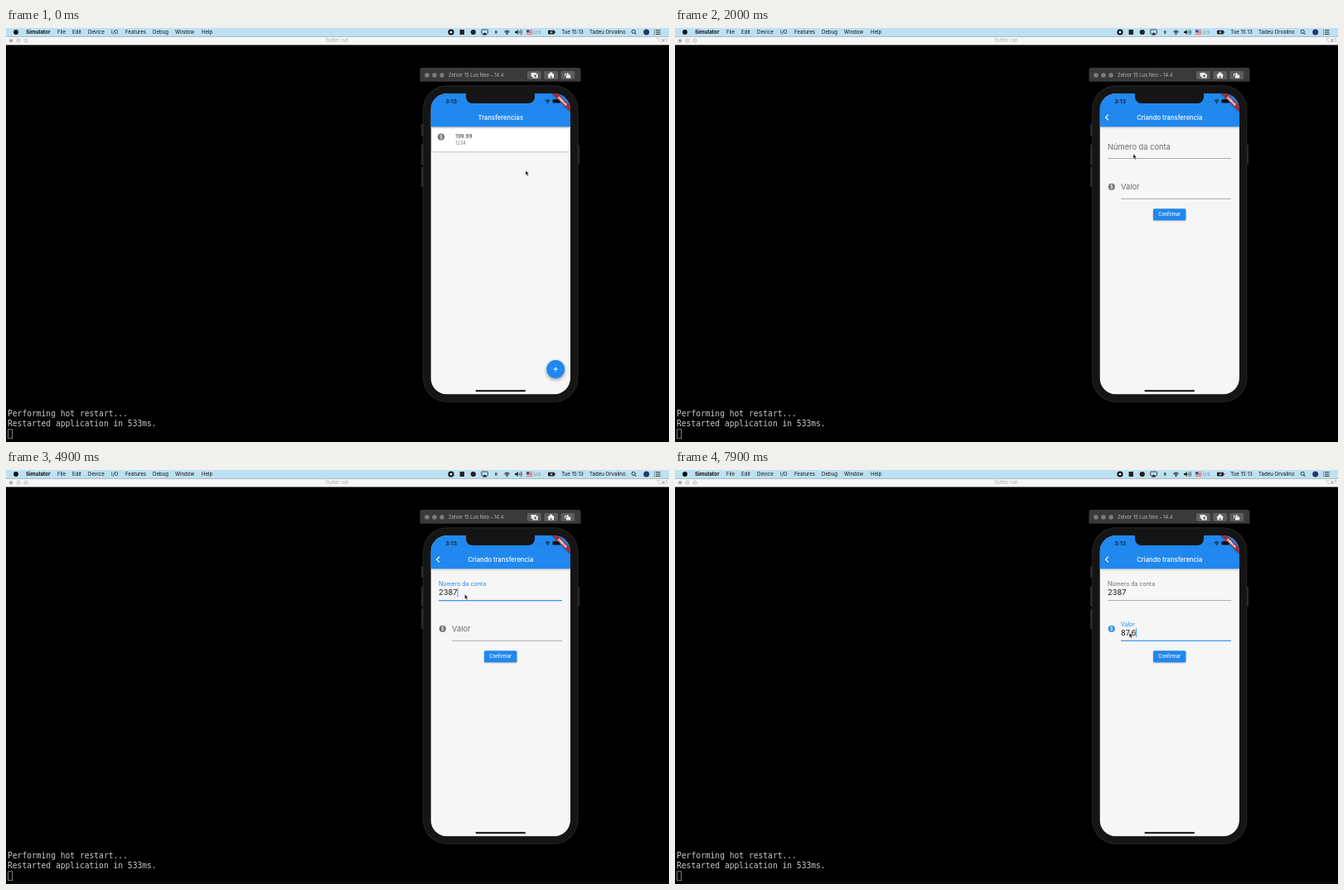
Recreate the animation shown at these times as an HTML page with a canvas. Size 800 by 500 pixels, loop 8 s.

```html
<!DOCTYPE html>
<html lang="pt">
<head>
<meta charset="utf-8">
<title>Transferencias</title>
<style>
html, body { margin: 0; width: 100%; height: 100%; overflow: hidden; background: #000; }
canvas { display: block; width: 800px; height: 500px; }
</style>
</head>
<body>
<canvas id="stage"></canvas>
<script>
const canvas = document.getElementById('stage');
const ctx = canvas.getContext('2d');
const ratio = window.devicePixelRatio || 1;
canvas.width = 800 * ratio;
canvas.height = 500 * ratio;

const LOOP = 8000, STEP = 100;
const BLUE = '#2088ee', GRAY = '#6c6c6c', PAGE = '#f6f6f6', INK = '#1c1c1c';
const SANS = 'Inter, "Liberation Sans", sans-serif';
const SCREEN = { x: 512.5, y: 79, w: 168.5, h: 363.5, r: 20 };

const PUSH_AT = 1480, PUSH_MS = 400;
const account = { focus: 2250, blur: 5710, keys: [[3850, '2'], [4150, '3'], [4400, '8'], [4820, '7']] };
const amount = { focus: 5710, blur: Infinity, keys: [[6670, '8'], [7020, '7'], [7330, '.'], [7560, '6']] };
const pointerPath = [
  [50, 627, 172], [450, 640, 290], [900, 662.5, 401.5], [1500, 662.5, 401.5],
  [1950, 553, 152], [2250, 553, 152], [2350, 553.5, 150], [4900, 553.5, 150], [5500, 548.3, 196.5]
];

const clamp = v => Math.max(0, Math.min(1, v));
const smooth = v => { v = clamp(v); return v * v * (3 - 2 * v); };
const mix = (a, b, k) => a + (b - a) * k;
const ramp = (t, start, ms) => clamp((t - start) / ms);

function mixColor(a, b, k) {
  const part = (c, i) => parseInt(c.slice(1 + 2 * i, 3 + 2 * i), 16);
  return `rgb(${[0, 1, 2].map(i => Math.round(mix(part(a, i), part(b, i), k)))})`;
}

function rect(x, y, w, h, color) {
  ctx.fillStyle = color;
  ctx.fillRect(x, y, w, h);
}

function round(x, y, w, h, r, color) {
  ctx.beginPath();
  ctx.roundRect(x, y, w, h, r);
  if (color) { ctx.fillStyle = color; ctx.fill(); }
}

function disc(x, y, r, color) {
  ctx.beginPath();
  ctx.arc(x, y, r, 0, 7);
  ctx.fillStyle = color;
  ctx.fill();
}

function line(color, width, ...pts) {
  ctx.beginPath();
  for (let i = 0; i < pts.length; i += 2) ctx.lineTo(pts[i], pts[i + 1]);
  ctx.strokeStyle = color;
  ctx.lineWidth = width;
  ctx.stroke();
}

function shape(color, ...pts) {
  ctx.beginPath();
  for (let i = 0; i < pts.length; i += 2) ctx.lineTo(pts[i], pts[i + 1]);
  ctx.closePath();
  ctx.fillStyle = color;
  ctx.fill();
}

// y is the middle of the capital letters
function text(str, x, y, size, color, weight = 400, align = 'left') {
  ctx.font = `${weight} ${size}px ${SANS}`;
  ctx.textAlign = align;
  ctx.fillStyle = color;
  ctx.fillText(str, x, y + size * 0.36);
}

function withShadow(color, blur, dy, draw) {
  ctx.save();
  ctx.shadowColor = color;
  ctx.shadowBlur = blur * ratio;
  ctx.shadowOffsetY = dy * ratio;
  draw();
  ctx.restore();
}

function wifi(x, y, size) {
  ctx.strokeStyle = '#111';
  ctx.lineWidth = size * 0.2;
  for (const k of [0.45, 0.75, 1.05]) {
    ctx.beginPath();
    ctx.arc(x, y, size * k, -2.35, -0.79);
    ctx.stroke();
  }
  disc(x, y - size * 0.1, size * 0.18, '#111');
}

function magnifier(x, y) {
  ctx.beginPath();
  ctx.arc(x, y, 2.1, 0, 7);
  ctx.strokeStyle = '#111';
  ctx.lineWidth = 0.8;
  ctx.stroke();
  line('#111', 0.9, x + 1.5, y + 1.5, x + 3.4, y + 3.4);
}

function menuBar() {
  rect(0, 0, 800, 10.3, '#bce1f2');
  disc(12, 5, 2.9, '#111');
  text('Simulator', 24, 5.1, 6.3, '#111', 700);
  const menus = { File: 62, Edit: 80, Device: 99, 'I/O': 127, Features: 144, Debug: 177, Window: 204, Help: 236 };
  for (const name in menus) text(name, menus[name], 5.1, 6.1, '#111');

  disc(537, 5, 3.6, '#111');
  disc(537, 5, 1.5, '#e4f2f8');
  rect(547.6, 2, 5.4, 6, '#222');
  disc(563.8, 5, 3.1, '#222');
  round(573.8, 2, 7.6, 5, 0.7);
  ctx.strokeStyle = '#222';
  ctx.lineWidth = 0.8;
  ctx.stroke();
  shape('#222', 575, 8.5, 577.6, 5.2, 580.2, 8.5);
  rect(590, 3.2, 2.6, 3.6, '#55666e');
  wifi(604.5, 7.8, 4.4);
  shape('#222', 614, 4, 615.5, 4, 617.7, 2, 617.7, 8, 615.5, 6, 614, 6);
  for (const r of [1.6, 3.2, 4.8]) {
    ctx.beginPath();
    ctx.arc(617.6, 5, r, -0.75, 0.75);
    ctx.strokeStyle = '#222';
    ctx.lineWidth = 0.7;
    ctx.stroke();
  }
  rect(628, 2.4, 7.4, 5.2, '#f1e4e6');
  for (let i = 0; i < 4; i++) rect(628, 2.4 + i * 1.5, 7.4, 0.75, '#cf4353');
  rect(628, 2.4, 3.4, 2.8, '#35518f');
  text('U.S.', 637, 5.2, 5, '#62757e');
  round(654, 2.8, 8, 4.6, 0.8, '#222');
  rect(662.4, 4.2, 0.8, 1.8, '#222');
  shape('#d6ebf4', 658.7, 3.2, 656.3, 5.4, 657.8, 5.4, 657.3, 7, 659.8, 4.7, 658.2, 4.7);
  text('Tue 15:13', 670.2, 5.1, 6.1, '#111');
  text('Tadeu Orvalino', 704, 5.1, 6.1, '#111');
  magnifier(757.2, 4.4);
  disc(772.7, 5, 3.5, '#27356b');
  for (const y of [2.7, 5, 7.3]) {
    rect(782, y - 0.4, 1, 0.9, '#222');
    rect(784, y - 0.4, 5.6, 0.9, '#222');
  }
}

function terminal() {
  rect(0, 10.3, 800, 10.2, '#f6f6f6');
  for (const x of [6, 15, 24]) {
    disc(x, 15.3, 2.7, '#c9c9c9');
    disc(x, 15.3, 2.2, x === 6 ? '#d4d4d4' : '#dedede');
  }
  disc(6, 15.3, 0.9, '#555');
  text('flutter run', 399.6, 15.3, 6, '#adadad', 400, 'center');
  text('⌥⌘1', 798, 15.3, 5.6, '#9a9a9a', 400, 'right');

  ctx.font = '9.65px "DejaVu Sans Mono", monospace';
  ctx.textAlign = 'left';
  ctx.fillStyle = '#c9c9c9';
  ctx.fillText('Performing hot restart...', 2, 468.6);
  ctx.fillText('Restarted application in 533ms.', 2, 481.2);
  ctx.strokeStyle = '#9a9a9a';
  ctx.lineWidth = 0.8;
  ctx.strokeRect(2.6, 484.8, 5, 11);
}

function simulatorBar() {
  round(499.5, 48, 194, 16.8, [3, 3, 0, 0], '#3a3a3a');
  for (const x of [508, 517, 526]) disc(x, 57, 2.8, '#7b7b7b');
  text('Zelvor 15 Lux Neo – 14.4', 534, 57, 5.8, '#b9b9b9');
  for (const x of [629, 649.3, 669.5]) round(x, 52, 16.8, 10, 1.8, '#5d5d5d');
  round(633.5, 54, 6.2, 4.6, 0.6, '#e6e6e6');
  round(635.3, 55.6, 6.5, 4.8, 0.8, '#f2f2f2');
  disc(638.6, 58, 1.4, '#5d5d5d');
  shape('#f2f2f2', 653.2, 57.2, 657.7, 53, 662.2, 57.2, 661, 57.2, 661, 60.5, 654.4, 60.5, 654.4, 57.2);
  rect(656.9, 58, 1.6, 2.5, '#5d5d5d');
  round(676, 56.6, 5.2, 4, 0.5, '#f2f2f2');
  line('#f2f2f2', 0.9, 674.5, 58.5, 674.5, 55.4, 678, 55.4);
  shape('#f2f2f2', 677.2, 53.7, 679.4, 55.4, 677.2, 57);
}

function appBar(title) {
  withShadow('rgba(0,0,0,.35)', 3, 1, () => rect(SCREEN.x, SCREEN.y, SCREEN.w, 40.3, BLUE));
  text(title, 596.8, 108, 7.65, '#fff', 500, 'center');
}

function coin(x, y, color) {
  disc(x, y, 4, color);
  text('$', x, y, 6.4, PAGE, 600, 'center');
}

function listPage() {
  rect(SCREEN.x, SCREEN.y, SCREEN.w, SCREEN.h, PAGE);
  withShadow('rgba(0,0,0,.3)', 2, 0.5, () => round(514, 120.8, 165.6, 28.2, 1.4, '#fff'));
  coin(525, 131.6, GRAY);
  text('199.99', 542.3, 130.8, 6.4, '#2a2a2a');
  text('1234', 542.3, 139.2, 5.5, '#7d7d7d');
  appBar('Transferencias');
  withShadow('rgba(0,0,0,.38)', 4.5, 2, () => disc(663.2, 412, 11, BLUE));
  line('#fff', 0.9, 660.5, 412, 665.9, 412);
  line('#fff', 0.9, 663.2, 409.3, 663.2, 414.7);
}

function caretAlpha(t, field) {
  const last = field.keys.reduce((at, [k]) => k <= t ? k : at, field.focus);
  const s = t - last - 700;
  if (s < 0) return 1;
  const phase = s % 1000;
  return phase < 500 ? 1 - ramp(phase, 0, 200) : ramp(phase, 500, 200);
}

function textField(t, field, x, y, label, hint) {
  const lift = smooth(ramp(t, field.focus, 200));
  const active = lift * (1 - ramp(t, field.blur, 200));
  const value = field.keys.filter(([at]) => at <= t).map(k => k[1]).join('');
  const tint = mixColor(GRAY, BLUE, active);
  text(label, x, y - 5.8 * lift, mix(9.3, 7, lift), tint);

  const hintAlpha = lift * (1 - ramp(t, field.keys[0][0], 200));
  ctx.globalAlpha = hintAlpha;
  text(hint, x, y + 4.3, 9.4, '#858585');
  ctx.globalAlpha = 1;
  text(value, x, y + 4.3, 9.4, INK);

  if (t >= field.focus && t < field.blur) {
    ctx.globalAlpha = caretAlpha(t, field);
    rect(x + ctx.measureText(value).width, y - 1, 0.8, 11, BLUE);
    ctx.globalAlpha = 1;
  }
  const thick = mix(0.65, 1.1, active);
  rect(x, y + 14.2 - thick / 2, 671 - x, thick, mixColor('#858585', BLUE, active));
  return tint;
}

function formPage(t) {
  rect(SCREEN.x, SCREEN.y, SCREEN.w, SCREEN.h, PAGE);
  appBar('Criando transferencia');
  line('#fff', 1.2, 523, 104.6, 519.6, 108, 523, 111.4);
  textField(t, account, 522, 143.5, 'Número da conta', '0000');
  const tint = textField(t, amount, 538, 192, 'Valor', '00.00');
  coin(526.8, 191.7, tint);
  withShadow('rgba(0,0,0,.3)', 2, 0.7, () => round(577, 218.3, 39.4, 14, 1.5, BLUE));
  text('Confirmar', 596.7, 225.3, 5.55, '#fff', 500, 'center');
}

function debugRibbon() {
  ctx.save();
  ctx.translate(SCREEN.x + SCREEN.w, SCREEN.y);
  ctx.rotate(Math.PI / 4);
  withShadow('rgba(0,0,0,.5)', 2.4, 0, () => rect(-16, 11, 32, 4.7, '#a42a38'));
  text('DEBUG', 0, 13.4, 4, '#fff', 900, 'center');
  ctx.restore();
}

function phone(t) {
  for (const [x, y, h] of [[501, 116, 14], [501, 140.5, 24.5], [501, 167.5, 24.5], [689, 141, 24]])
    round(x, y, 3, h, 0.8, '#2b2b2b');
  round(503, 69.3, 187.4, 382.7, 29, '#222');
  round(504.2, 70.5, 185, 380.3, 28, '#151515');

  ctx.save();
  round(SCREEN.x, SCREEN.y, SCREEN.w, SCREEN.h, SCREEN.r);
  ctx.clip();
  const k = ramp(t, PUSH_AT, PUSH_MS);
  const push = 1 - Math.pow(1 - k, 3.4);
  if (push < 1) {
    ctx.save();
    ctx.translate(-push * SCREEN.w / 3, 0);
    listPage();
    ctx.restore();
  }
  if (push > 0) {
    ctx.save();
    ctx.translate((1 - push) * SCREEN.w, 0);
    formPage(t);
    ctx.restore();
  }
  text('3:13', 530.2, 88.3, 6.7, '#10243a', 700);
  for (let i = 0; i < 4; i++) disc(641.8 + i * 1.9, 89.7, 0.4, '#174f88');
  wifi(653.6, 90.6, 3.8);
  round(659.5, 86, 9.6, 4.6, 1.1, '#111');
  debugRibbon();
  ctx.restore();

  round(555, 76, 83, 15, [0, 0, 7.5, 7.5], '#151515');
  round(566.5, 437.2, 60.5, 2, 1, '#0a0a0a');
}

function pointer(t) {
  let i = pointerPath.findIndex(p => p[0] > t);
  if (i < 0) i = pointerPath.length;
  const a = pointerPath[Math.max(0, i - 1)], b = pointerPath[Math.min(i, pointerPath.length - 1)];
  const k = a === b ? 0 : smooth(ramp(t, a[0], b[0] - a[0]));
  ctx.save();
  ctx.translate(mix(a[1], b[1], k), mix(a[2], b[2], k));
  shape('#111', 0, 0, 0, 5.9, 1.3, 4.7, 2.3, 7, 3.3, 6.6, 2.3, 4.3, 4.1, 4.2);
  ctx.strokeStyle = 'rgba(255,255,255,.85)';
  ctx.lineWidth = 0.5;
  ctx.stroke();
  ctx.restore();
}

function draw(now) {
  const t = Math.floor((now % LOOP) / STEP) * STEP;
  ctx.setTransform(ratio, 0, 0, ratio, 0, 0);
  rect(0, 0, 800, 500, '#000');
  terminal();
  menuBar();
  simulatorBar();
  phone(t);
  pointer(t);
}

const start = performance.now();
function tick() {
  draw(performance.now() - start);
  requestAnimationFrame(tick);
}
tick();
</script>
</body>
</html>
```
